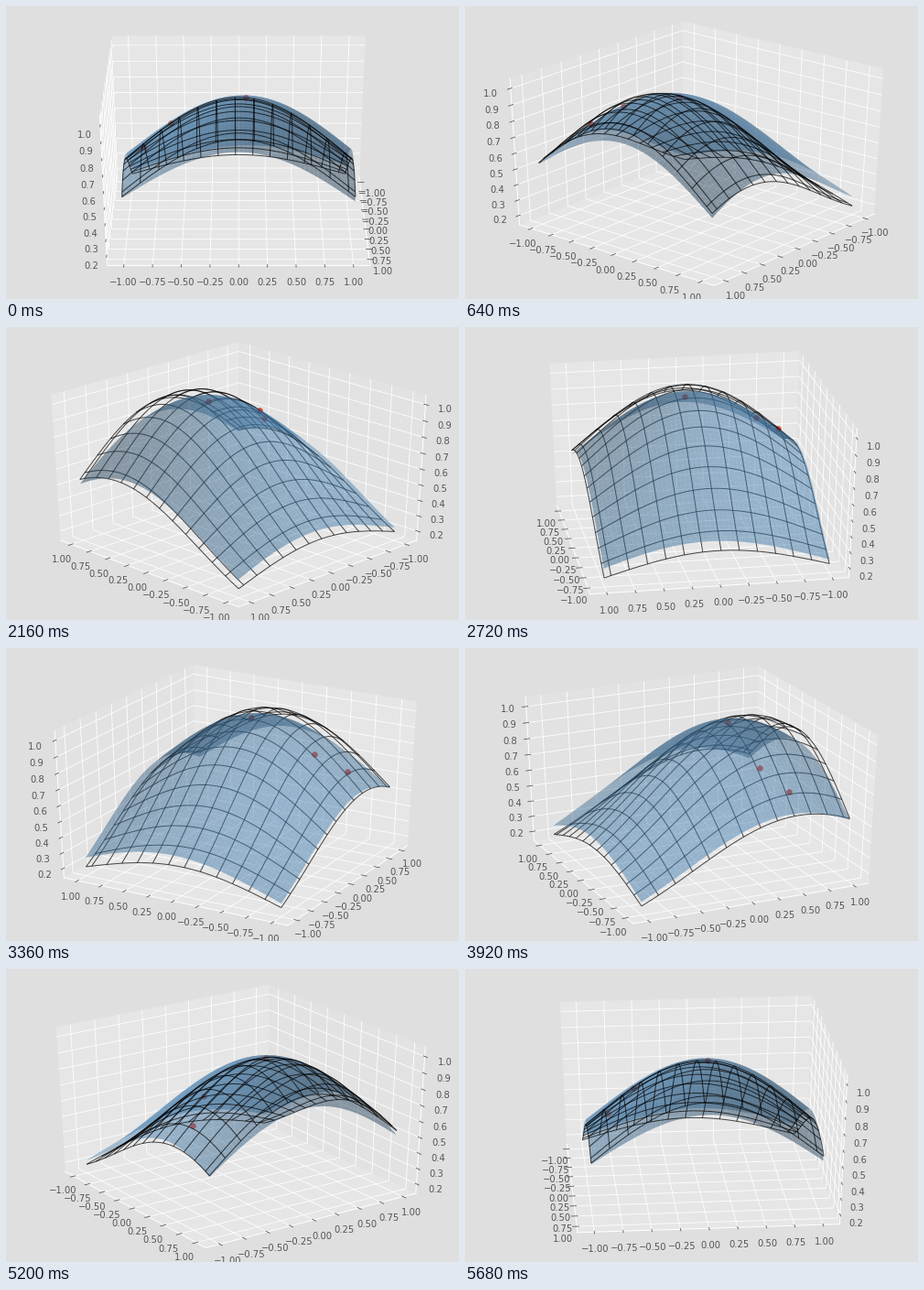
Write a matplotlib script that moves like this. It is 495x320 px and loops after 5.76 s.

```python
import numpy as np
import matplotlib.pyplot as plt
from matplotlib.animation import FuncAnimation
from matplotlib.colors import to_rgb

WIDTH, HEIGHT, DPI = 495, 320, 72
BLEED = 3  # pixels the axes reach past each side of the figure
FRAMES, INTERVAL = 72, 80
BACKDROP = "#DFDFDF"
LIGHT = np.array([-1, -1, 0.5]) / 1.5


def kernel(x, y, cx, cy):
    return np.exp(-((x - cx) ** 2 + (y - cy) ** 2) / 2)


def truth(x, y):
    return kernel(x, y, 0.5, 0)


# Sample points and the kernel interpolation through them
px = np.array([0.49, 0.32, 0.32])
py = np.array([-0.82, -0.585, 0.06])
pz = truth(px, py)
weights = np.linalg.solve(kernel(px[:, None], py[:, None], px, py), pz)


def estimate(x, y):
    return sum(w * kernel(x, y, a, b) for w, a, b in zip(weights, px, py))


def grid(n):
    side = np.linspace(-1, 1, n)
    return np.meshgrid(side, side)


def shaded(z, step, color, alpha):
    """Colour each cell by the angle between its normal and the light."""
    gy, gx = np.gradient(z, step)
    normal = np.stack([-gx, -gy, np.ones_like(z)], axis=-1)
    normal /= np.linalg.norm(normal, axis=-1, keepdims=True)
    shade = normal @ LIGHT
    shade = (shade - shade.min()) / np.ptp(shade)
    rgba = np.empty(z.shape + (4,))
    rgba[..., :3] = (0.5 + 0.5 * shade[..., None]) * to_rgb(color)
    rgba[..., 3] = alpha
    return rgba


plt.style.use("ggplot")
fig = plt.figure(figsize=(WIDTH / DPI, HEIGHT / DPI), dpi=DPI,
                 facecolor=BACKDROP)
rect = [-BLEED / WIDTH, -BLEED / HEIGHT,
        1 + 2 * BLEED / WIDTH, 1 + 2 * BLEED / HEIGHT]
ax = fig.add_axes(rect, projection="3d", facecolor=BACKDROP)
# Let the cube stretch with the wide axes instead of staying square
ax.apply_aspect = lambda position=None: None
ax.set_box_aspect((1, 1, 1), zoom=3 ** 0.5 / 1.8294640721620434)

n = 51
sx, sy = grid(n)
sz = estimate(sx, sy)
ax.plot_surface(sx, sy, sz, rstride=1, cstride=1, linewidth=0, shade=False,
                facecolors=shaded(sz, 2 / (n - 1), "steelblue", 0.5))

wx, wy = grid(100)
ax.plot_wireframe(wx, wy, truth(wx, wy), rstride=8, cstride=8,
                  color="black", linewidth=1, alpha=0.7)
ax.scatter(px, py, pz, s=36, color="#E24A33", depthshade=False)

ax.set_xlim(-1.1458, 1.1458)
ax.set_ylim(-1.1458, 1.1458)
ax.set_zlim(0.138, 1.0585)
ax.set_xticks(np.linspace(-1, 1, 9))
ax.set_yticks(np.linspace(-1, 1, 9))
ax.set_zticks(np.linspace(0.2, 1, 9))
ax.xaxis.set_pane_color("#E6E6E6")
ax.yaxis.set_pane_color("#E2E2E2")
ax.zaxis.set_pane_color("#E6E6E6")


def update(i):
    # The tiny offset settles which walls face away at right angles
    ax.view_init(elev=30, azim=360 * i / FRAMES + 0.01)
    return (ax,)


anim = FuncAnimation(fig, update, frames=FRAMES, interval=INTERVAL,
                     repeat=True, blit=False)
plt.show()
```
